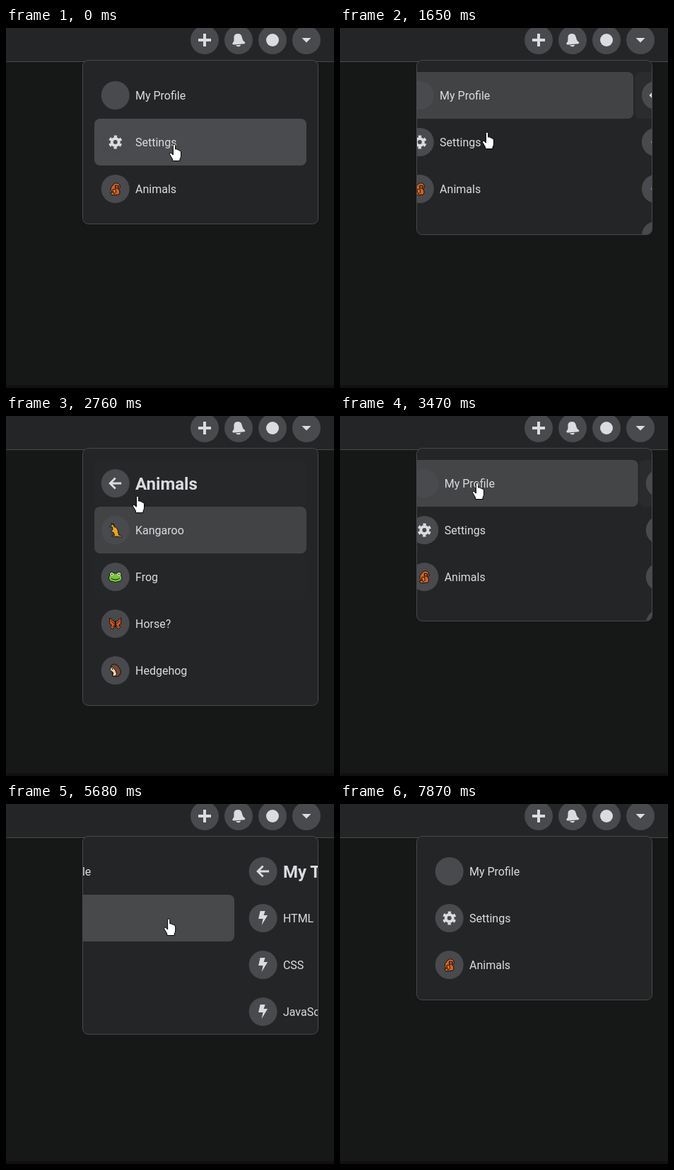
An HTML page for the animation above (8.15 s loop, 464 by 508 pixels).

```html
<!DOCTYPE html>
<html lang="en">
<head>
<meta charset="utf-8">
<title>Dropdown menu</title>
<style>
  html, body { margin: 0; width: 100%; height: 100%; overflow: hidden; background: #161817; }
  svg { display: block; width: 464px; height: 508px; font: 16px Roboto, Arial, sans-serif; }
  text, .glyph { fill: #dadce1; }
  .line { fill: none; stroke: #dadce1; }
  .title { font-size: 24px; font-weight: 700; }
  .disc { fill: #484a4d; }
  .hover { fill: #4a4b4e; }
  .emoji { stroke: #111; stroke-width: 1; stroke-linejoin: round; }
  .pointer { fill: #fff; stroke: #000; stroke-width: 1; stroke-linejoin: round; }
</style>
</head>
<body>
<svg viewBox="0 0 464 508">
  <defs><clipPath id="clip"><rect id="clipBox" x="109" y="46" width="332" rx="7"/></clipPath></defs>
  <rect y="504" width="464" height="4" fill="#130e10"/>
  <rect width="464" height="47" fill="#242526"/>
  <rect y="47" width="464" height="1" fill="#474a4d"/>
  <g id="bar"></g>
  <rect id="panel" x="108.5" y="45.5" width="333" rx="8" fill="#242526" stroke="#474a4d"/>
  <g id="menus" clip-path="url(#clip)"></g>
  <path id="hand" class="pointer" d="M-1.6 1.6a1.6 1.6 0 0 1 3.2 0V7q2.5-.8 3 .9 2.2-.5 2.6 1.1 2.3-.2 2.3 2V16q0 3-1.5 5v2.5H-2.5V21L-6.3 14.5q-1-2 .4-2.4 1.6-.2 4.3 2.9z"/>
  <path id="arrow" class="pointer" d="M0 0V16l3.7-3.5 2.6 6 2.5-1-2.6-5.9H11.2z"/>
</svg>
<script>
const $ = id => document.getElementById(id);
const LOOP = 8150, SPEED = 500;

// Icons are drawn around their own centre.
const glyph = d => `<path class="glyph" d="${d}"/>`;
const line = (d, w) => `<path class="line" stroke-width="${w}" d="${d}"/>`;
const emoji = (...parts) => parts.map(([fill, d]) => `<path class="emoji" fill="${fill}" d="${d}"/>`).join('');
const dot = (x, y, r, fill) => `<circle cx="${x}" cy="${y}" r="${r}" fill="${fill}"/>`;

const icons = {
  none: '',
  plus: line('M-9 0H9M0-9V9', 4),
  bell: glyph('M-6.5-5Q-5.5-9-1-9 3.5-9 4.5-5L5.7-1Q6.3 1.5 9 3q1 1.5-.7 2.2L-6 6.5Q-9.5 6.8-8.5 4.3-6.3 2.5-6.5-.5z')
      + glyph('M-4 7.3L3 6.7Q2.5 9.3-.5 9.3-3 9.3-4 7.3z'),
  chat: dot(0, 0, 9, '#dadce1'),
  caret: glyph('M-6.5-3H6.5L0 3.5z'),
  gear: '<circle class="line" r="5" stroke-width="4"/>'
      + '<circle class="line" r="8" stroke-width="3.2" stroke-dasharray="4.19" transform="rotate(15)"/>',
  back: line('M8.5 0H-7M0-7.5L-7.5 0 0 7.5', 2.8),
  bolt: glyph('M-4-10H3L1-4H6.5L-2 10 0 1H-6.5z'),
  ape: emoji(['#d9601a', 'M-2-7Q2-10 6-6L7-2 4 0Q8 4 5 8L-5 9-7 6-4 5Q-8 2-6-2z'],
             ['#8b4a2b', 'M0-5L5-4 4-1 0-1z'], ['#e87422', 'M-4 1L0 0 1 5-2 7z']) + dot(2, -3, .8, '#6fb0d8'),
  kangaroo: emoji(['#e9a21f', 'M-8-5L-5-7-5-10-3-7-2-9-2-5Q4-3 4 3L5 7 9 8 8 10 3 9-5 9-5 8-1 7-3 3-6 3-6 1-4 0-4-4z']),
  frog: emoji(['#77c53a', 'M-8-2Q-9-7-5-7-3-7-2-5H2Q3-7 5-7 9-7 8-2 11 2 7 6 0 9-7 6-11 2-8-2z'])
      + dot(-5, -3.5, 2, '#fff') + dot(5, -3.5, 2, '#fff') + dot(-5, -3.5, 1.1, '#111') + dot(5, -3.5, 1.1, '#111')
      + '<path d="M-6 2Q0 6 6 2" fill="none" stroke="#111"/>',
  butterfly: emoji(['#d7571f', 'M0-2L-8-8-8 0-5 2-7 5-4 8 0 3 4 8 7 5 5 2 8 0 8-8z'],
                   ['#e5793a', 'M-1 1L-6-4M1 1L6-4M-1 2L-4 5M1 2L4 5']) + '<path d="M0-4V5" stroke="#111" stroke-width="2"/>',
  hedgehog: emoji(['#75492f', 'M-6-7L-2-9 3-7 6-3 8 2 6 7 2 9-4 8z'],
                  ['#efd3b0', 'M-5-5L-2-3 0 0 2 5 0 8-4 8-3 3-8-1z']) + dot(-4, -2, .9, '#111')
};
const button = (x, y, icon) =>
  `<g transform="translate(${x} ${y})"><circle class="disc" r="20"/>${icons[icon]}</g>`;

const menuRows = {
  main: [['none', 'My Profile'], ['gear', 'Settings'], ['ape', 'Animals']],
  tutorial: [['back', 'My Tutorial'], ['bolt', 'HTML'], ['bolt', 'CSS'], ['bolt', 'JavaScript'], ['bolt', 'Awesome!']],
  animals: [['back', 'Animals'], ['kangaroo', 'Kangaroo'], ['frog', 'Frog'], ['butterfly', 'Horse?'], ['hedgehog', 'Hedgehog']]
};
const row = ([icon, label], i) => {
  const title = icon === 'back';
  return `<g transform="translate(125 ${62 + 66 * i})">
    <rect class="hover" width="300" height="66" rx="8"/>${button(29.7, 33, icon)}
    <text x="58" y="${title ? 42 : 39}" class="${title ? 'title' : ''}">${label}</text></g>`;
};
$('bar').innerHTML = ['plus', 'bell', 'chat', 'caret'].map((icon, i) => button(281 + 48 * i, 17, icon)).join('');
$('menus').innerHTML = Object.entries(menuRows)
  .map(([name, rows]) => `<g id="${name}">${rows.map(row).join('')}</g>`).join('');
const caretDisc = $('bar').lastChild.querySelector('.disc');

// Bursts of evenly spaced screen updates: first, last, count.
const bursts = [[280, 1250, 8], [1380, 2070, 6], [2350, 3320, 8], [3470, 4430, 8],
  [4990, 5950, 8], [6080, 6630, 5], [6900, 7870, 8]];
// Start of each slide and the submenu involved.
const slides = [[230, 'tutorial', true], [1356, 'tutorial', false], [2250, 'animals', true],
  [3156, 'animals', false], [5560, 'tutorial', true], [6840, 'tutorial', false]];
// Menu, row, pointer enters, pointer leaves.
const hovers = [
  ['main', 1, -500, 400], ['tutorial', 1, 420, 700], ['tutorial', 0, 700, 1400],
  ['main', 0, 1390, 1640], ['main', 1, 1640, 1820], ['main', 2, 1820, 2400],
  ['animals', 2, 2400, 2460], ['animals', 1, 2460, 2730], ['animals', 0, 2730, 3200],
  ['main', 0, 3190, 3850], ['main', 1, 5300, 5700], ['tutorial', 1, 5730, 6100],
  ['tutorial', 0, 6100, 6920], ['main', 0, 6880, 7150], ['main', 1, 7150, 7220], ['main', 2, 7220, 7300]
];
// Pointer path: time, x, y.
const path = [[0, 238, 164], [280, 238, 164], [700, 205, 128], [1100, 165, 97], [1380, 165, 97], [1656, 208, 147],
  [2070, 200, 222], [2300, 200, 222], [2460, 196, 194], [2766, 186, 113], [3000, 162, 96], [3180, 164, 95],
  [3470, 194, 94], [3850, 300, 62], [4250, 424, 9], [4430, 424, 14], [4880, 424, 14], [4990, 383, 46],
  [5300, 260, 130], [5500, 232, 162], [5700, 230, 162], [6100, 200, 128], [6630, 174, 101],
  [6900, 174, 101], [7150, 190, 128], [7220, 200, 194], [7300, 215, 262], [7600, 250, 520]];

// CSS "ease": cubic-bezier(.25, .1, .25, 1)
function ease(x) {
  if (x <= 0) return 0;
  if (x >= 1) return 1;
  let lo = 0, hi = 1;
  const at = (s, a, b) => 3 * s * (1 - s) ** 2 * a + 3 * s * s * (1 - s) * b + s ** 3;
  for (let i = 0; i < 20; i++) {
    const mid = (lo + hi) / 2;
    if (at(mid, .25, .25) < x) lo = mid; else hi = mid;
  }
  return at(lo, .1, 1);
}
const fade = (t, on, off, span) => ease((Math.min(t, off) - on) / span) * (1 - ease((t - off) / span));

function snap(t) {
  const burst = bursts.findLast(([from]) => t >= from);
  if (!burst) return 0;
  const [from, to, count] = burst, step = (to - from) / (count - 1);
  return from + step * Math.min(count - 1, Math.floor((t - from) / step + .1));
}

function pointerAt(t) {
  const i = path.findIndex(([time]) => time > t);
  if (i < 0) return path.at(-1).slice(1);
  const [t0, x0, y0] = path[i - 1], [t1, x1, y1] = path[i], k = (t - t0) / (t1 - t0);
  return [x0 + (x1 - x0) * k, y0 + (y1 - y0) * k];
}

function draw(t) {
  const [start, sub, opening] = slides.findLast(([from]) => t >= from) || [-SPEED, 'tutorial', false];
  const p = ease((t - start) / SPEED), open = opening ? p : 1 - p;
  const height = 231 + 132 * open;
  $('panel').setAttribute('height', height);
  $('clipBox').setAttribute('height', height - 1);

  const place = (name, x, shown) => {
    $(name).setAttribute('transform', `translate(${x} 0)`);
    $(name).style.display = shown ? '' : 'none';
  };
  place('main', -365 * open, open < 1);
  for (const name of ['tutorial', 'animals']) place(name, 330 * (1 - open), name === sub && open > 0);

  for (const name in menuRows) {
    // The main menu is laid out wider while it slides.
    const width = name === 'main' && open > 0 ? 332 : 300;
    [...$(name).children].forEach((item, i) => {
      const levels = hovers.filter(h => h[0] === name && h[1] === i).map(h => fade(t, h[2], h[3], SPEED));
      const box = item.firstElementChild;
      box.setAttribute('width', width);
      box.setAttribute('opacity', Math.max(0, ...levels));
    });
  }
  caretDisc.style.filter = `brightness(${1 + .25 * fade(t, 4180, 4960, 300)})`;

  const [x, y] = pointerAt(t);
  const link = Math.hypot(x - 425, y - 17) < 20 || (x > 125 && x < 425 && y >= 62 && y < 28 + height);
  for (const id of ['hand', 'arrow']) {
    $(id).setAttribute('transform', `translate(${x} ${y})`);
    $(id).style.display = (id === 'hand') === link ? '' : 'none';
  }
}

const begin = performance.now();
function tick() {
  draw(snap((performance.now() - begin) % LOOP));
  requestAnimationFrame(tick);
}
tick();
</script>
</body>
</html>
```
